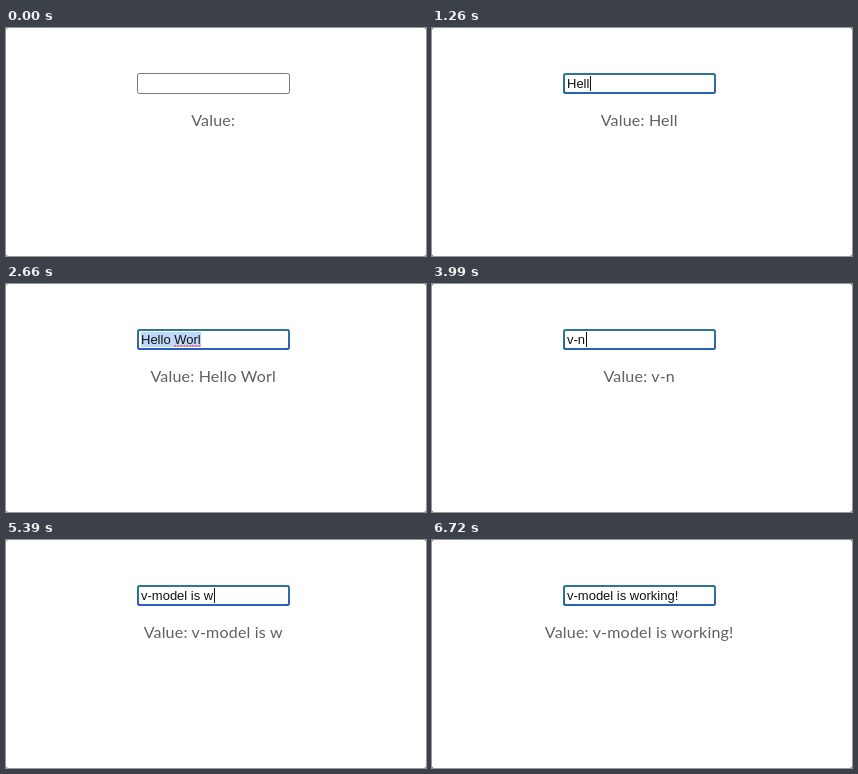
Animation of 420 by 228 pixels, one loop 6930 ms. Source, as an HTML page:

```html
<!DOCTYPE html>
<html lang="en">
<head>
<meta charset="utf-8">
<title>Text input bound to a value</title>
<style>
  html, body { margin: 0; width: 100%; height: 100%; overflow: hidden; background: #fff; }
  svg { display: block; width: 420px; height: 228px; }
  text { white-space: pre; }
  #typed { font: 13px "Liberation Sans", Arial, sans-serif; fill: #111; }
  #value { font: 16px Lato, sans-serif; letter-spacing: 0.2px; fill: #606060; text-anchor: middle; }
</style>
</head>
<body>
<svg viewBox="0 0 420 228">
  <defs>
    <linearGradient id="ring" x1="0" y1="0" x2="0" y2="1">
      <stop offset="0" stop-color="#2f7791"/>
      <stop offset="1" stop-color="#2c5fba"/>
    </linearGradient>
  </defs>
  <rect width="420" height="228" fill="#555"/>
  <rect width="420" height="228" rx="2" fill="#fff"/>
  <rect id="box" x="131.5" y="45.5" width="152" height="20" rx="2" fill="#fff" stroke="#777"/>
  <rect id="focus" x="132" y="46" width="151" height="19" rx="2" fill="none" stroke="url(#ring)" stroke-width="2"/>
  <rect id="selection" x="135" y="48" height="15" fill="#bcd9fa"/>
  <text id="typed" x="135" y="60"></text>
  <line id="squiggle" y1="62" y2="62" stroke="#e0555f" stroke-width="1.5" stroke-dasharray="2 1"/>
  <rect id="caret" y="48" width="1" height="15" fill="#111"/>
  <text id="value" x="207.2" y="98"></text>
</svg>
<script>
const LOOP = 6930, FOCUS = 280, SELECT = 2660, CLEAR = 2800, BLINK = 6720;

// [first keystroke, text kept before it, characters added, ms per character]
const bursts = [
  [0, "", "", 0],
  [840, "", "H", 0],
  [1050, "H", "el", 70],
  [1260, "Hel", "l", 0],
  [1470, "Hell", "o ", 70],
  [1680, "Hello ", "Wor", 140],
  [2100, "Hello Wor", "ld", 0],
  [2310, "Hello Worl", "", 0],
  [CLEAR, "", "", 0],
  [3220, "", "v", 0],
  [3710, "v", "-", 0],
  [3990, "v-", "n", 0],
  [4480, "v-", "", 0],
  [4620, "v-", "mo", 70],
  [4830, "v-mo", "del ", 70],
  [5180, "v-model ", "is", 0],
  [5320, "v-model is", " w", 70],
  [5530, "v-model is w", "ork", 70],
  [5880, "v-model is work", "ing", 70],
  [6160, "v-model is working", "!", 0]
];

const $ = id => document.getElementById(id);
const [focus, selection, typed, squiggle, caret, value] =
  ["focus", "selection", "typed", "squiggle", "caret", "value"].map($);
const START = 135;

function textAt(t) {
  const [at, kept, added, pace] = bursts.findLast(b => b[0] <= t);
  const count = pace ? Math.floor((t - at) / pace) + 1 : added.length;
  return kept + added.slice(0, count);
}

function show(el, on) {
  el.setAttribute("visibility", on ? "visible" : "hidden");
}

const pen = document.createElement("canvas").getContext("2d");
pen.font = '13px "Liberation Sans", Arial, sans-serif';
const widthOf = s => pen.measureText(s).width;

function draw(t) {
  const text = textAt(t);
  const end = START + widthOf(text);
  const selected = t >= SELECT && t < CLEAR;

  typed.textContent = text;
  value.textContent = ("Value: " + text).trimEnd();
  caret.setAttribute("x", Math.round(end + 0.6));
  selection.setAttribute("width", end - START + 0.5);
  squiggle.setAttribute("x1", START + widthOf("Hello "));
  squiggle.setAttribute("x2", end);

  show(focus, t >= FOCUS);
  show(selection, selected);
  show(squiggle, selected);
  show(caret, t >= FOCUS && t < BLINK && !selected);
}

const began = performance.now();
function tick() {
  draw((performance.now() - began) % LOOP);
  requestAnimationFrame(tick);
}
draw(0);
requestAnimationFrame(tick);
</script>
</body>
</html>
```
